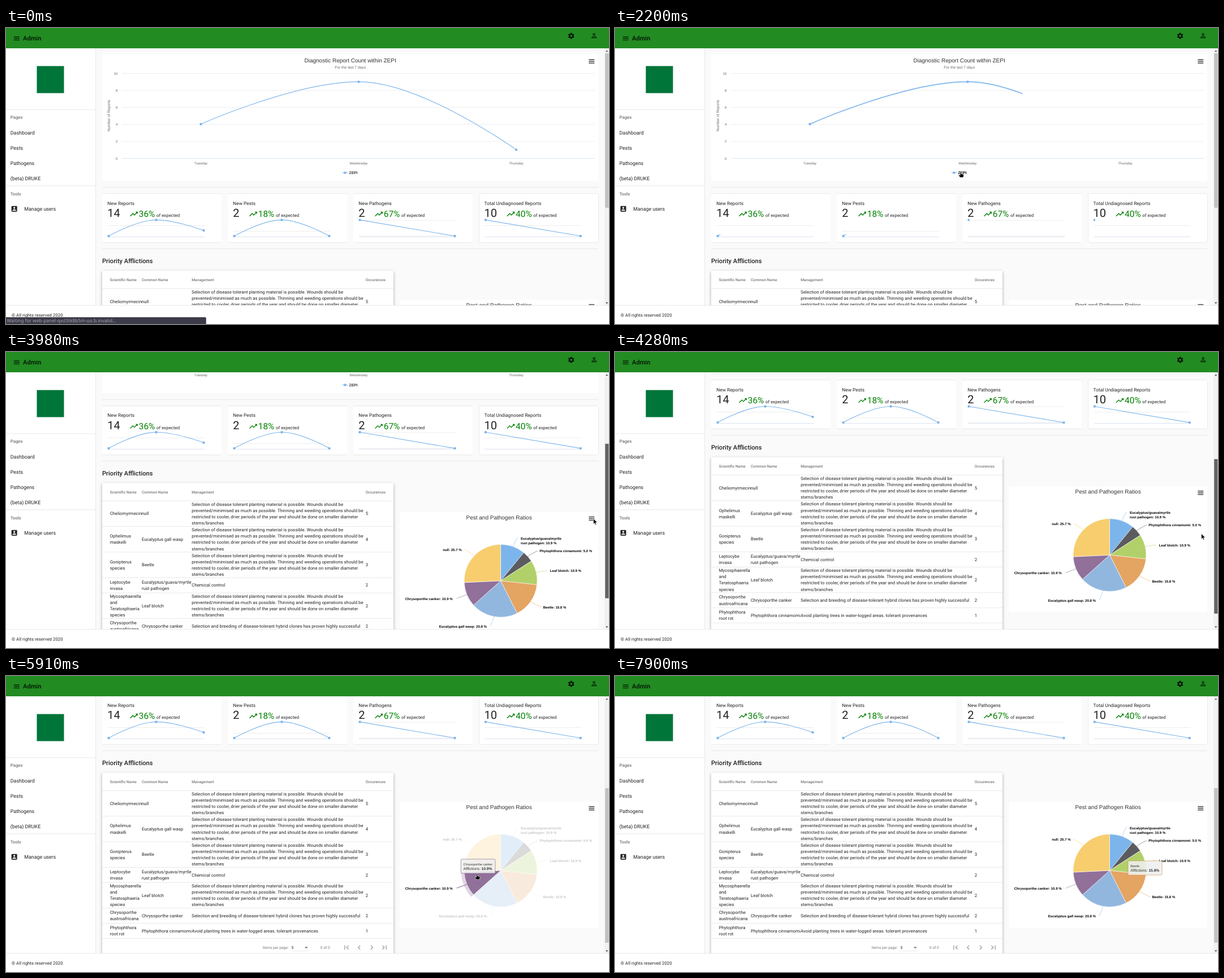
An HTML page for the animation above (7.92 s loop, 1066 by 525 pixels).

```html
<!DOCTYPE html>
<html lang="en">
<head>
<meta charset="utf-8">
<title>Admin dashboard</title>
<style>
html, body { margin: 0; width: 100%; height: 100%; overflow: hidden; background: #fff; }
svg { display: block; width: 1066px; height: 525px; text-rendering: geometricPrecision; }
text { font-family: Roboto, sans-serif; font-size: 7.77px; fill: #212121; white-space: pre; }
.body { letter-spacing: .042px; }
.chart { font-family: "Liberation Sans", Arial, sans-serif; fill: #333; }
.axis { font-size: 6.1px; fill: #666; }
.sub { font-size: 6.66px; fill: #666; }
.title { font-size: 10px; }
.key { font-size: 6.66px; font-weight: 700; }
.slice-label { font-size: 6.1px; font-weight: 700; fill: #000; }
.nav { font-size: 8.88px; }
.group { font-weight: 500; fill: #757575; }
.heading { font-size: 11.1px; font-weight: 500; fill: rgba(0,0,0,.87); }
.head { font-size: 6.66px; font-weight: 500; fill: #757575; }
.small { font-size: 6.66px; fill: #757575; }
.card-title { font-size: 8.36px; }
.count { font-size: 20px; }
.percent { font-size: 15.4px; fill: #008000; }
.status { font-family: "Noto Sans", sans-serif; font-size: 8.35px; fill: #a5a5b2; }
.rule { stroke: #e0e0e0; stroke-width: .7; }
.grid { stroke: #e6e6e6; stroke-width: .7; }
.base { stroke: #ccd6eb; stroke-width: .7; }
.line { fill: none; stroke: #7cb5ec; stroke-width: 1.11; stroke-linejoin: round; }
.dot { fill: #7cb5ec; }
.burger { stroke: #4a4a4a; stroke-width: 1.6; }
.card { fill: #fff; filter: drop-shadow(0 .9px .6px rgba(0,0,0,.36)); }
.sheet { fill: #fff; filter: drop-shadow(0 2px 2.6px rgba(0,0,0,.34)); }
#tip rect { fill: rgba(247,247,247,.85); stroke-width: .6; filter: drop-shadow(.5px .5px .6px rgba(0,0,0,.25)); }
</style>
</head>
<body>
<svg id="stage" viewBox="0 0 1066 525" xmlns="http://www.w3.org/2000/svg"></svg>
<script>
const LOOP = 7920, BLUE = '#7cb5ec', INK = '#041204', ORG = 'ZEPI';
const PIE = { x: 874.5, y: 345, r: 64.5, scroll: 259 };
const PIE_IN = 4918, PIE_OUT = 7435;

// ---- markup helpers ----
const text = (x, y, s, cls = 'body', more = '') => `<text x="${x}" y="${y}" class="${cls}" ${more}>${s}</text>`;
const rect = (x, y, w, h, more = '') => `<rect x="${x}" y="${y}" width="${w}" height="${h}" ${more}/>`;
const line = (x1, y1, x2, y2, cls) => `<line x1="${x1}" y1="${y1}" x2="${x2}" y2="${y2}" class="${cls}"/>`;
const hline = (x1, x2, y, cls = 'rule') => line(x1, y, x2, y, cls);
const path = (d, more = '') => `<path d="${d}" ${more}/>`;
const dot = (x, y, r = 2.2) => `<circle cx="${x}" cy="${y}" r="${r}" class="dot"/>`;
const icon = (x, y, size, body, more = '') =>
  `<g transform="translate(${x} ${y}) scale(${size / 24})" ${more}>${body}</g>`;
const burger = y => [-3, 0, 3].map(d => hline(1030.3, 1040.2, y + d, 'burger')).join('');
const MID = 'text-anchor="middle"', END = 'text-anchor="end"';

// Three points with a flat peak, or two points joined straight
function curve(p) {
  if (p.length < 3) return `M${p[0]}L${p[1]}`;
  const [a, b, c] = p, lx = (1.5 * b[0] + a[0]) / 2.5, rx = (1.5 * b[0] + c[0]) / 2.5;
  return `M${a}C${a} ${lx},${b[1]} ${b}C${rx},${b[1]} ${c} ${c}`;
}
const series = (p, id) => `<g clip-path="url(#${id}Clip)">${path(curve(p), `class="line" id="${id}"`)}${p.map(q => dot(...q)).join('')}</g>`;
const clip = (id, x, y, w, h) => `<clipPath id="${id}Clip">${rect(x, y, w, h)}</clipPath>`;

// ---- fixed frame ----
function toolbar() {
  const teeth = [0, 1, 2, 3, 4, 5].map(k => rect(10, 2, 4, 5, `rx=".6" transform="rotate(${k * 60} 12 12)"`)).join('');
  const gear = `<circle cx="12" cy="12" r="5.3" fill="none" stroke="${INK}" stroke-width="3.7"/>` + teeth;
  const person = `<g fill="none" stroke="${INK}" stroke-width="2"><circle cx="12" cy="8" r="3"/>` +
    path('M5 19v-1c0-2 4.5-3 7-3s7 1 7 3v1z') + '</g>';
  const bars = [6, 11, 16].map(y => rect(3, y, 18, 2)).join('');
  return rect(0, 0, 1066, 36, 'fill="#228b22"') +
    icon(12.2, 11.8, 13.3, bars, `fill="${INK}"`) + text(30, 22.4, 'Admin', 'heading') +
    icon(992.5, 7.3, 13.3, gear, `fill="${INK}"`) + icon(1033, 7, 13.3, person);
}

function sidebar() {
  const pages = ['Dashboard', 'Pests', 'Pathogens', '(beta) DRUKE'];
  const badge = rect(3, 3, 18, 18, 'rx="2" fill="#212121"') + '<circle cx="12" cy="9" r="3" fill="#fff"/>' +
    path('M6 18v-1c0-2 4-3.1 6-3.1s6 1.1 6 3.1v1z', 'fill="#fff"');
  return rect(0, 36, 158.5, 456, 'fill="#fff"') + line(158.6, 36, 158.6, 492, 'rule') +
    rect(54.5, 67.5, 48, 48, 'fill="#00753a"') +
    hline(0, 158, 144.8) + text(7.8, 161.2, 'Pages', 'group') +
    pages.map((s, i) => text(7.8, 188.7 + i * 27, s, 'nav')).join('') +
    hline(0, 158, 279.8) + text(7.8, 296.5, 'Tools', 'group') +
    icon(8, 314, 13.3, badge) + text(32.2, 324, 'Manage users', 'nav');
}

const footer = () => rect(0, 492, 1066, 33, 'fill="#fff"') + hline(0, 1066, 492) +
  text(10, 512.2, '© All rights reserved 2020');

// ---- scrolling page ----
function mainChart() {
  let s = rect(170, 46, 877, 225, 'fill="#fff"') +
    text(608.6, 60.7, 'Diagnostic Report Count within ' + ORG, 'chart title', MID) +
    text(608.6, 72, 'For the last 7 days', 'chart sub', MID) + burger(59.2) +
    text(0, 0, 'Number of Reports', 'chart sub', MID + ' transform="translate(183.6 155.5) rotate(-90)"');
  for (let v = 0; v <= 10; v += 2) {
    const y = 231.3 - v * 15.08;
    s += hline(205, 1041, y, v ? 'grid' : 'base') + text(197.5, y + 2.2, v, 'chart axis', END);
  }
  ['Tuesday', 'Wednesday', 'Thursday'].forEach((d, i) => s += text(344.6 + i * 278.7, 241.5, d, 'chart axis', MID));
  return s + series([[344.5, 170.5], [623.4, 95.4], [902, 215.9]], 'main') +
    hline(595, 603.8, 256.6, 'line') + dot(599.4, 256.6) + text(606.6, 258.8, ORG, 'chart key', 'id="legend"');
}

const STATS = [
  { x: 170, name: 'New Reports', n: 14, pct: 36, grid: 350.5, ys: [369, 340.4, 359], at: 2070 },
  { x: 392, name: 'New Pests', n: 2, pct: 18, grid: 360.6, ys: [369, 340.4, 369], at: 2070 },
  { x: 614, name: 'New Pathogens', n: 2, pct: 67, grid: 341, ys: [340.4, 369], at: 2110 },
  { x: 836.3, name: 'Total Undiagnosed Reports', n: 10, pct: 40, grid: 350.5, ys: [340.4, 369], at: 2110 }
];
const TREND = path('M16 6l2.29 2.29-4.88 4.88-4-4L2 16.59 3.41 18l6-6 4 4 6.3-6.29L22 12V6z', 'fill="#008000"');

function statCard(c, i) {
  const dx = c.x - (c.n < 10 ? 11 : 0), step = 168 / (c.ys.length - 1);
  const pts = c.ys.map((y, k) => [c.x + 11.5 + k * step, y]);
  return rect(c.x, 293.7, 211, 86.6, 'rx="2" class="card"') +
    text(c.x + 9.3, 313.6, c.name, 'card-title') + text(c.x + 9.2, 335.4, c.n, 'count') +
    icon(dx + 47.7, 321.7, 16.6, TREND) + text(dx + 64.8, 335.2, c.pct + '%', 'percent') +
    text(dx + 96, 334.8, 'of expected') +
    `<g class="mini">${hline(c.x + 10, c.x + 181, c.grid, 'grid')}${hline(c.x + 10, c.x + 181, 370.4, 'base')}` +
    (i === 2 ? hline(c.x + 10, c.x + 181, 368.9, 'grid') : '') + series(pts, 'mini' + i) + '</g>';
}

const ADVICE = ['Selection of disease tolerant planting material is possible. Wounds should be',
  'prevented/minimised as much as possible. Thinning and weeding operations should be',
  'restricted to cooler, drier periods of the year and should be done on smaller diameter', 'stems/branches'];
const ROWS = [
  [['Cheliomyrmecin'], ['null'], ADVICE, 5],
  [['Ophelimus', 'maskelli'], ['Eucalyptus gall wasp'], ADVICE, 4],
  [['Gonipterus', 'species'], ['Beetle'], ADVICE, 3],
  [['Leptocybe', 'invasa'], ['Eucalyptus/guava/myrtle', 'rust pathogen'], ['Chemical control'], 2],
  [['Mycosphaerella', 'and', 'Teratosphaeria', 'species'], ['Leaf blotch'], ADVICE, 2],
  [['Chrysoporthe', 'austroafricana'], ['Chrysoporthe canker'],
    ['Selection and breeding of disease-tolerant hybrid clones has proven highly successful'], 2],
  [['Phytophthora', 'root rot'], ['Phytophthora cinnamomi'],
    ['Avoid planting trees in water-logged areas. tolerant provenances'], 1]
];
const COLS = [183.7, 240, 328.3, 635.7];

function table() {
  let y = 462.2;
  let s = text(170, 416.8, 'Priority Afflictions', 'heading') + rect(170, 430.5, 515, 325, 'class="sheet"') + hline(170, 685, y);
  ['Scientific Name', 'Common Name', 'Management', 'Occurences'].forEach((h, i) => s += text(COLS[i], 449, h, 'head'));
  for (const row of ROWS) {
    const h = row[0].length > 3 || row[2].length > 3 ? 45.4 : 26.9;
    row.forEach((cell, c) => [].concat(cell).forEach((t, i, all) =>
      s += text(COLS[c], y + h / 2 + (i - (all.length - 1) / 2) * 11.15 + 2.7, t)));
    s += hline(170, 685, y += h);
  }
  const arrows = ['M18.4 16.6L13.8 12l4.6-4.6L17 6l-6 6 6 6zM6 6h2v12H6z', 'M15.4 7.4L14 6l-6 6 6 6 1.4-1.4L10.8 12z',
    'M10 6L8.6 7.4 13.2 12l-4.6 4.6L10 18l6-6z', 'M5.6 7.4l4.6 4.6-4.6 4.6L7 18l6-6-6-6zM16 6h2v12h-2z'];
  return s + text(453.6, 743.3, 'Items per page:', 'small') + text(504.4, 743.3, '5', 'small', 'style="fill:#212121"') +
    hline(504, 536, 746.6) + path('M528 739.5h5.6l-2.8 2.9z', 'fill="#757575"') + text(555.8, 743.3, '0 of 0', 'small') +
    arrows.map((d, i) => icon(594.3 + i * 22.3, 732.8, 15.5, path(d, 'fill="#9a9a9a"'))).join('');
}

// Label anchors are relative to the stage at full scroll
const SLICES = [
  { name: 'Eucalyptus/guava/myrtle rust pathogen', n: 11, color: BLUE, lines: ['Eucalyptus/guava/myrtle', 'rust pathogen: 10.9 %'], x: 910, y: 272, from: [904.5, 268] },
  { name: 'Phytophthora cinnamomi', n: 5, color: '#5b5b60', x: 943.3, y: 294.3, from: [939.5, 292] },
  { name: 'Leaf blotch', n: 11, color: '#b2d06a', x: 961.8, y: 329.5, from: [956.5, 327] },
  { name: 'Beetle', n: 16, color: '#e4a462', x: 949.4, y: 394.4, from: [946.5, 392] },
  { name: 'Eucalyptus gall wasp', n: 21, color: '#91b7df', x: 850, y: 428, from: [856, 425.7], end: true },
  { name: 'Chrysoporthe canker', n: 11, color: '#91709a', x: 789.7, y: 378.8, from: [796.5, 376.3], end: true },
  { name: 'null', n: 26, color: '#f7cd6e', x: 805.7, y: 292, from: [811, 289.5], end: true }
];
const TOTAL = SLICES.reduce((a, s) => a + s.n, 0);
let turn = 0;
for (const s of SLICES) {
  s.a = turn;
  s.b = turn += s.n / TOTAL * 2 * Math.PI;
  s.pct = (s.n / TOTAL * 100).toFixed(1);
}
const polar = (a, r) => [PIE.x + r * Math.sin(a), PIE.y - r * Math.cos(a)];
const wedge = (s, r) => `M${PIE.x} ${PIE.y}L${polar(s.a, r)}A${r} ${r} 0 0 1 ${polar(s.b, r)}Z`;

function pie() {
  const parts = SLICES.map(s => {
    const mid = (s.a + s.b) / 2, labels = s.lines || [`${s.name}: ${s.pct} %`];
    return `<g class="slice">${path(wedge(s, PIE.r + 5.5), `class="halo" fill="${s.color}" fill-opacity=".28" visibility="hidden"`)}` +
      path(wedge(s, PIE.r), `fill="${s.color}" stroke="#fff" stroke-width=".6"`) +
      path(`M${s.from}Q${polar(mid, PIE.r + 7)} ${polar(mid, PIE.r)}`, `class="link" fill="none" stroke="${s.color}" stroke-width=".6"`) +
      labels.map((t, i) => text(s.x, s.y + i * 7.7, t, 'chart slice-label', s.end ? END : '')).join('') + '</g>';
  }).join('');
  return `<g transform="translate(0 ${PIE.scroll})">` + rect(696, 223, 351, 223.5, 'fill="#fff"') +
    text(871.6, 236, 'Pest and Pathogen Ratios', 'chart title', MID) + burger(234.6) + parts + '</g>';
}

const stage = document.getElementById('stage');
stage.innerHTML = '<defs>' + clip('view', 159, 36, 899, 456) + clip('main', 205, 80, 836, 155) +
  STATS.map((c, i) => clip('mini' + i, c.x + 9, 335, 171, 40)).join('') + '</defs>' +
  rect(0, 0, 1066, 525, 'fill="#fff"') + rect(159, 36, 907, 456, 'fill="#fafafa"') +
  '<g id="page"><g clip-path="url(#viewClip)"><g id="scroller">' + mainChart() + hline(170, 1047, 282.5) +
  STATS.map(statCard).join('') + hline(170, 1047, 391.6) + table() + pie() + '</g></g>' +
  rect(1058, 36, 8, 456, 'fill="#f1f1f1"') + path('M1060 42l2.2-2.6 2.2 2.6zM1060 486.6l2.2 2.6 2.2-2.6z', 'fill="#505050"') +
  rect(1059.2, 44.8, 6.2, 274, 'id="thumb"') + '</g>' +
  sidebar() + toolbar() + rect(0, 0, 1066, 492, 'id="blank" fill="#fff"') + footer() +
  '<g id="status">' + path('M0 513H352q1.8 0 1.8 1.8V525H0z', 'fill="#3b3b49"') +
  text(1.5, 522.2, 'Waiting for web-panel-qxd3tk8b5m-uo.b.invalid...', 'status') + '</g>' +
  '<g id="tip"><rect rx="1.7"/>' + text(4.3, 11.2, '', 'chart', 'id="tipName" style="font-size:5.55px"') +
  text(4.3, 19.2, 'Afflictions: <tspan font-weight="700"></tspan>', 'chart', 'id="tipValue" style="font-size:6.66px"') + '</g>' +
  '<g id="cursor" fill="#000" stroke="#fff" stroke-width=".6" stroke-linejoin="round">' +
  path('M0 0V9.6L2.2 7.6 3.7 11 5.3 10.3 3.8 7H6.8Z', 'id="arrow"') +
  path('M-.9.6a.9.9 0 0 1 1.8 0V3.8L4.6 4.6Q5.6 5 5.4 6.2L4.8 10H-1L-3.4 6.4Q-3.4 5-2.3 5.3L-.9 6.3Z', 'id="hand"') + '</g>';

// ---- motion ----
const POINTER = [[810, 92, 4], [1230, 563, 205], [1430, 580, 228], [1730, 611, 255], [2350, 611, 255], [2950, 1059, 180],
  [3250, 1058, 185], [3510, 1049, 232], [3980, 1038.5, 295.5], [4380, 1036, 331], [4660, 990.3, 342.5], [4850, 950, 358],
  [4950, 930, 366], [5140, 920, 373], [5450, 880, 385], [5750, 845, 365], [5910, 832.5, 351], [6200, 835, 320],
  [6500, 862, 300], [6730, 885, 305], [6950, 905, 310], [7150, 922, 328], [7350, 930, 348], [7435, 935, 354],
  [7600, 1055, 518], [7640, 1063, 530]];
const SCROLL = [[0, 0], [3250, 0], [3510, 83], [3980, 198], [4380, 259]];

const $ = id => document.getElementById(id);
const clamp = v => Math.max(0, Math.min(1, v));
const ease = v => (1 - Math.cos(Math.PI * clamp(v))) / 2;
const show = (el, on) => el.setAttribute('visibility', on ? 'visible' : 'hidden');
const place = (el, on) => el.setAttribute('display', on ? 'inline' : 'none');
const move = (el, x, y) => el.setAttribute('transform', `translate(${x} ${y})`);

function track(keys, t) {
  const i = keys.findIndex(k => k[0] > t);
  if (i === 0) return keys[0].slice(1);
  if (i < 0) return keys[keys.length - 1].slice(1);
  const a = keys[i - 1], b = keys[i], f = (t - a[0]) / (b[0] - a[0]);
  return a.slice(1).map((v, k) => v + (b[k + 1] - v) * f);
}

function sliceAt(x, y) {
  const angle = (Math.atan2(x - PIE.x, PIE.y - y) + 2 * Math.PI) % (2 * Math.PI);
  return SLICES.findIndex(s => angle < s.b);
}

const slices = [...document.querySelectorAll('.slice')], minis = [...document.querySelectorAll('.mini')];

// Returns whether the pointer is over the pie
function drawPie(t) {
  const used = t >= PIE_IN, inside = used && t < PIE_OUT;
  const [x, y] = track(POINTER, Math.min(t, PIE_OUT));
  const hot = used ? sliceAt(x, y) : -1;
  const dim = clamp((t - PIE_IN) / 50) * (1 - clamp((t - PIE_OUT) / 250));
  slices.forEach((g, i) => {
    const active = inside && i === hot;
    g.setAttribute('opacity', i === hot ? 1 : 1 - .78 * dim);
    show(g.querySelector('.halo'), active);
    g.querySelector('.link').setAttribute('stroke-width', active ? 1.1 : .6);
  });
  show($('tip'), used);
  if (!used) return false;
  const s = SLICES[hot];
  $('tipName').textContent = s.name;
  $('tipValue').querySelector('tspan').textContent = s.pct + '%';
  const w = Math.max($('tipName').getComputedTextLength(), $('tipValue').getComputedTextLength()) + 9;
  const box = $('tip').querySelector('rect');
  box.setAttribute('width', w);
  box.setAttribute('height', 25);
  box.setAttribute('stroke', s.color);
  move($('tip'), x + 2 - w / 2, y - 26);
  return inside;
}

function draw(t) {
  const loaded = t < 490;
  show($('blank'), t >= 490 && t < 600);
  show($('status'), t < 870);
  place($('page'), loaded || t >= 1430);

  const [top] = track(SCROLL, t);
  move($('scroller'), 0, -top);
  move($('thumb'), 0, top / 1.68);
  $('thumb').setAttribute('fill', t > 3200 && t < 4400 ? '#636363' : '#c1c1c1');

  const reveal = (id, start, w) =>
    $(id + 'Clip').firstChild.setAttribute('width', w * (loaded ? 1 : ease((t - start) / 1000)));
  reveal('main', 1626, 836);
  STATS.forEach((c, i) => {
    reveal('mini' + i, c.at, 175);
    place(minis[i], loaded || t >= 1900);
  });

  const onKey = t > 1700 && t < 2370;
  $('main').style.strokeWidth = onKey ? 1.67 : 1.11;
  $('legend').style.fill = onKey ? '#000' : '#333';

  const hand = drawPie(t) || onKey;
  show($('arrow'), !hand && t >= 810 && t < 7640);
  show($('hand'), hand);
  move($('cursor'), ...track(POINTER, t));
}

const begin = performance.now();
function tick() {
  draw((performance.now() - begin) % LOOP);
  requestAnimationFrame(tick);
}
tick();
</script>
</body>
</html>
```
